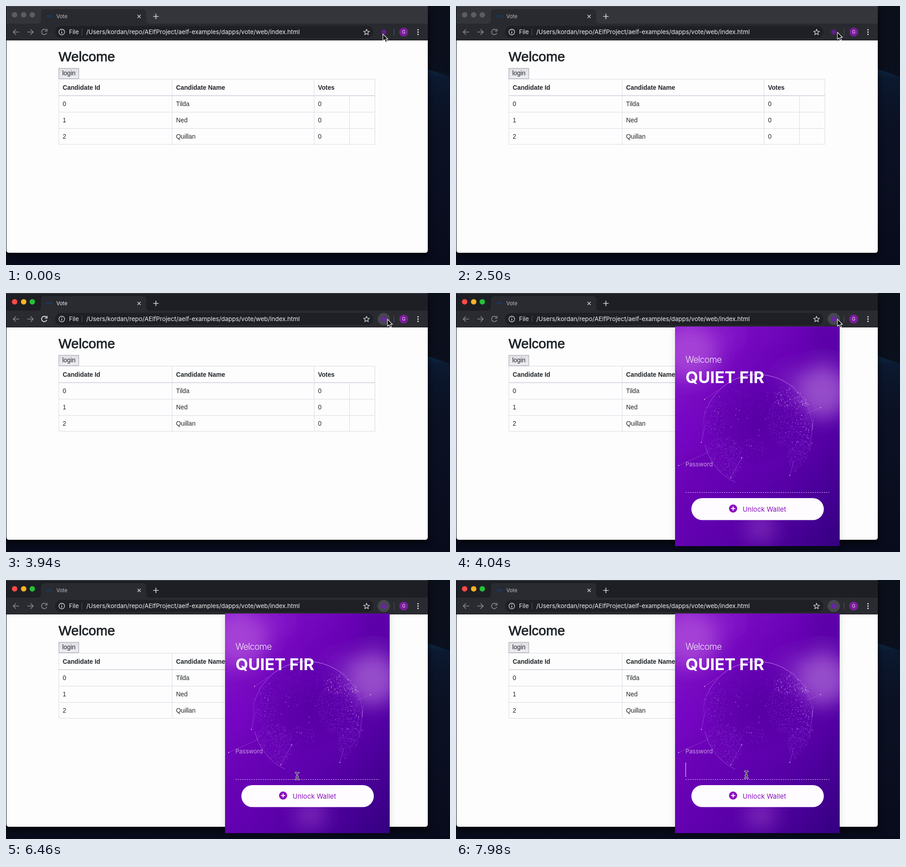
Recreate the animation shown at these times as an HTML page. Size 979x572 px, loop 8000 ms.

```html
<!DOCTYPE html>
<html lang="en">
<head>
<meta charset="utf-8">
<title>Vote</title>
<style>
  html, body { margin: 0; width: 100%; height: 100%; overflow: hidden; background: #0a0d1c; }
  svg { display: block; width: 979px; height: 572px; }
  text { white-space: pre; }
  .ui { font-family: Inter, "Noto Sans", sans-serif; }
  .page { font: 13.8px "Liberation Sans", Arial, sans-serif; fill: #212529; }
  .bold { font-weight: 700; }
  .line { fill: none; stroke-width: 1.7; }
</style>
</head>
<body>
<svg viewBox="0 0 979 572">
  <defs>
    <linearGradient id="desk" x2="0" y2="1">
      <stop offset="0" stop-color="#0b0f1a"/>
      <stop offset=".6" stop-color="#0b1022"/>
      <stop offset="1" stop-color="#080b1c"/>
    </linearGradient>
    <linearGradient id="ridge" x2="0" y2="1">
      <stop offset="0" stop-color="#0c2a44"/>
      <stop offset=".1" stop-color="#0b1930"/>
      <stop offset="1" stop-color="#0a1024" stop-opacity="0"/>
    </linearGradient>
    <linearGradient id="button" x2="0" y2="1">
      <stop offset="0" stop-color="#dedee4"/>
      <stop offset="1" stop-color="#ececf1"/>
    </linearGradient>
    <linearGradient id="violet" x2="1" y2="1">
      <stop offset="0" stop-color="#8a16d0"/>
      <stop offset=".4" stop-color="#6a02b6"/>
      <stop offset=".7" stop-color="#5600a6"/>
      <stop offset="1" stop-color="#340080"/>
    </linearGradient>
    <linearGradient id="rim" x2="0" y2="1">
      <stop offset="0" stop-color="#d9a0ff" stop-opacity=".85"/>
      <stop offset=".45" stop-color="#c080f8" stop-opacity=".15"/>
      <stop offset=".7" stop-color="#c080f8" stop-opacity="0"/>
    </linearGradient>
    <radialGradient id="ball" cy=".4">
      <stop offset="0" stop-color="#4c0098" stop-opacity=".5"/>
      <stop offset=".75" stop-color="#5a00aa" stop-opacity=".4"/>
      <stop offset="1" stop-color="#6a08c0" stop-opacity=".1"/>
    </radialGradient>
    <filter id="soft" x="-60%" y="-60%" width="220%" height="220%"><feGaussianBlur stdDeviation="20"/></filter>
    <filter id="shade" x="-20%" y="-20%" width="140%" height="140%"><feGaussianBlur stdDeviation="7"/></filter>
    <clipPath id="card"><rect x="483" y="74" width="363" height="485"/></clipPath>
    <clipPath id="win"><path d="M1 0H930V539Q930 545 924 545H7Q1 545 1 539Z"/></clipPath>
  </defs>

  <rect width="979" height="572" fill="url(#desk)"/>
  <path d="M925 138L979 156V340H925Z" fill="url(#ridge)"/>
  <rect x="1" y="10" width="931" height="543" rx="6" fill="#000" opacity=".6" filter="url(#shade)"/>

  <g clip-path="url(#win)">
    <rect width="930" height="545" fill="#fdfdfd"/>
    <rect id="strip" width="930" height="40"/>
    <rect id="bar" y="39" width="930" height="36.5"/>
    <path id="tab" d="M69 39Q77 39 77 31V15Q77 7 85 7H301Q309 7 309 15V31Q309 39 317 39Z"/>
    <path d="M0 .5H930" stroke="#55565c"/>
    <path d="M0 75.5H930" stroke="#191a1e"/>
    <rect x="108" y="44" width="702" height="27" rx="13.5" fill="#1f2025"/>
  </g>

  <g id="lights"></g>
  <rect x="89" y="20" width="13" height="5" fill="#1b3552"/>
  <g class="ui">
    <text id="title" x="111" y="27" font-size="11.4">Vote</text>
    <text x="139" y="62" font-size="13" fill="#eeeef0">File</text>
    <text x="177" y="62" font-size="13.4" fill="#f0f0f2">/Users/kordan/repo/AElfProject/aelf-examples/dapps/vote/web/index.html</text>
  </g>
  <g class="line" stroke="#d4d5d8">
    <path d="M290 19.5l7 7m0-7l-7 7" stroke-width="1.4"/>
    <path d="M324.5 23h12M330.5 17v12"/>
    <path d="M29 57.5H16.5m5.5-6l-6 6 6 6M47 57.5H59.5m-5.5-6l6 6-6 6" stroke="#88898e"/>
    <path id="reload" d="M89 53.5A6 6 0 1 0 90 59.5M90.5 50.5V55.5H85.5"/>
    <circle cx="123" cy="57.5" r="6.2" stroke-width="1.4"/>
    <path d="M123 56.5V61M123 53.5V55" stroke-width="1.6"/>
    <path d="M167.5 50V65M855.5 50V65" stroke="#56575e" stroke-width="1"/>
    <path id="star" stroke-width="1.3" stroke-linejoin="round"/>
  </g>
  <circle id="halo" cx="833" cy="57.5" r="13.5"/>
  <circle id="ext" cx="833" cy="57.5" r="5.8"/>
  <circle cx="877" cy="57.5" r="9.8" fill="#7a1d9b"/>
  <text class="ui" x="877" y="61" font-size="9.8" text-anchor="middle" fill="#f3e8f7">G</text>
  <path d="M908.5 52.5v.01m0 5v.01m0 5v.01" stroke="#e6e6e8" stroke-width="3.2" stroke-linecap="round"/>

  <g class="page">
    <text x="116" y="121.5" font-size="30" stroke="#212529" stroke-width=".9">Welcome</text>
    <rect x="116.5" y="137.5" width="44" height="23" fill="url(#button)" stroke="#a3a3ad"/>
    <text x="124" y="153">login</text>
    <path d="M116.5 161.5H813.5V305.5H116.5ZM366.5 161V305M679.5 161V305M757.5 198V305M116 234.5H814M116 270.5H814" fill="none" stroke="#dadbe5"/>
    <path d="M116 198H814" stroke="#d8d9e2" stroke-width="2"/>
    <g id="cells"></g>
  </g>

  <g id="popup">
    <rect x="483" y="76" width="363" height="484" opacity=".15" filter="url(#shade)"/>
    <g clip-path="url(#card)">
      <rect x="483" y="74" width="363" height="485" fill="url(#violet)"/>
      <g id="glow" filter="url(#soft)"></g>
      <circle cx="665" cy="301" r="121" fill="url(#ball)"/>
      <circle cx="665" cy="301" r="121" fill="none" stroke="url(#rim)"/>
      <path d="M549 335A121 121 0 0 0 616 418" fill="none" stroke="#c88cf5" opacity=".5"/>
      <path id="dust" stroke="#b878ee" opacity=".5"/>
      <path id="sparks" stroke="#ecc8fb" stroke-width="1.6" opacity=".8"/>
      <path d="M491 381L556 352M606 408L630 364M773 266L804 253M548 235L578 214M541 330L549 292M736 403L745 370M788 278L779 347" fill="none" stroke="#d6a0f2" stroke-width=".8" opacity=".4"/>
      <path d="M491 381v.01M606 408v.01M630 364v.01M804 253v.01M548 235v.01M541 330v.01M736 403v.01" stroke="#f0d2ff" stroke-width="2" stroke-linecap="round"/>
    </g>
    <g class="ui" fill="#fff">
      <text x="506" y="153.5" font-size="19.5" font-weight="300" letter-spacing="-.7" opacity=".9">Welcome</text>
      <text x="506" y="199" font-size="36" font-weight="700">QUIET FIR</text>
      <text x="506" y="383" font-size="13" fill="#c99be4">Password</text>
      <path d="M506 440.5H823" stroke="#d9b2ee" stroke-dasharray="3 2"/>
      <rect x="519" y="453" width="292" height="48.5" rx="24.25" fill="#fefcff"/>
      <circle cx="611" cy="476" r="9" fill="#8a12bd"/>
      <path d="M606.5 476h9M611 471.5v9" stroke="#fff" stroke-width="2"/>
      <text x="632" y="482.5" font-size="14.8" fill="#8a12bd">Unlock Wallet</text>
    </g>
    <path id="caret" d="M506.5 403V435" stroke="#f3e4fb"/>
  </g>

  <path id="arrow" d="M0 0V15.5L3.6 12.2 6.2 18 9 16.8 6.5 11.2H11.3Z" fill="#08080c" stroke="#f4f4f6" stroke-width="1.2" stroke-linejoin="round"/>
  <g id="beam" fill="none" stroke-linecap="round"></g>
</svg>
<script>
const $ = id => document.getElementById(id);
const set = (id, name, value) => $(id).setAttribute(name, value);
const show = (id, on) => set(id, 'visibility', on ? 'visible' : 'hidden');

// Static parts
const label = (x, y, s, cls = '') => `<text x="${x}" y="${y}" class="${cls}">${s}</text>`;
const heads = ['Candidate Id', 'Candidate Name', 'Votes'];
const names = ['Tilda', 'Ned', 'Quillan'];
const columns = [125, 375, 688];
$('cells').innerHTML =
  heads.map((s, i) => label(columns[i], 184.5, s, 'bold')).join('') +
  names.map((name, r) => [r, name, 0].map((s, i) => label(columns[i], 221 + r * 36, s)).join('')).join('');

$('lights').innerHTML = [19, 39, 58].map(x => `<circle cx="${x}" cy="19.5" r="6"/>`).join('');

const beamPath = 'M-3.5 -7.5Q0 -7.5 0 -5Q0 -7.5 3.5 -7.5M0 -5V5M-3.5 7.5Q0 7.5 0 5Q0 7.5 3.5 7.5M-2 2H2';
$('beam').innerHTML = [['#f4eef8', 3.2], ['#16101e', 1.3]].map(([color, width]) =>
  `<path d="${beamPath}" stroke="${color}" stroke-width="${width}"/>`).join('');

set('star', 'd', 'M' + Array.from({ length: 10 }, (_, i) => {
  const a = i * Math.PI / 5 - Math.PI / 2, r = i % 2 ? 2.9 : 6.8;
  return `${(795 + r * Math.cos(a)).toFixed(2)} ${(58 + r * Math.sin(a)).toFixed(2)}`;
}).join('L') + 'Z');

const glows = [
  [515, 130, 62, '#b254dc', .7], [595, 95, 35, '#9428cf', .4],
  [808, 218, 58, '#a866d4', .75], [735, 190, 35, '#8532c8', .4],
  [672, 518, 34, '#9a48c8', .5], [505, 300, 40, '#7a0cd0', .4],
  [815, 100, 40, '#5400a0', .5]
];
$('glow').innerHTML = glows.map(([x, y, r, c, o]) =>
  `<circle cx="${x}" cy="${y}" r="${r}" fill="${c}" opacity="${o}"/>`).join('');

let seed = 11;
const rand = () => (seed = seed * 16807 % 2147483647) / 2147483647;

// Dots scattered in ellipses, kept inside the globe
function scatter(areas) {
  let d = '';
  for (const [cx, cy, rx, ry, n] of areas) {
    for (let i = 0; i < n; i++) {
      const a = rand() * 2 * Math.PI, r = Math.sqrt(rand());
      const x = cx + rx * r * Math.cos(a), y = cy + ry * r * Math.sin(a);
      if (Math.hypot(x - 665, y - 301) < 125) d += `M${x.toFixed(1)} ${y.toFixed(1)}h1`;
    }
  }
  return d;
}
set('dust', 'd', scatter([
  [590, 365, 42, 50, 620], [572, 275, 28, 45, 150], [735, 285, 50, 60, 480],
  [740, 230, 40, 28, 240], [757, 360, 26, 38, 300], [650, 345, 35, 22, 70], [645, 235, 60, 40, 70]
]));
set('sparks', 'd', scatter([
  [740, 232, 36, 22, 55], [768, 243, 10, 8, 24], [755, 295, 32, 40, 34],
  [565, 260, 25, 45, 14], [645, 290, 40, 50, 12], [782, 315, 9, 35, 12]
]));

// Moments of the hard changes, in ms
const FOCUS = 2960, PRESS = 3340, OPEN = 4040, CARET = 6880;

// Pointer: time, x, y
const track = [
  [0, 831, 62], [840, 831, 62], [960, 841, 58], [4700, 841, 58], [5340, 679, 413],
  [5440, 679, 413], [6180, 642, 433], [6500, 642, 433], [7020, 640, 430], [8000, 640, 430]
];
function pointer(t) {
  const i = Math.max(1, track.findIndex(k => k[0] > t));
  const [t0, x0, y0] = track[i - 1], [t1, x1, y1] = track[i];
  const p = (t - t0) / (t1 - t0), e = p * p * (3 - 2 * p);
  return [x0 + (x1 - x0) * e, y0 + (y1 - y0) * e];
}

function render(t) {
  const active = t >= FOCUS, open = t >= OPEN, focused = active && !open;
  const surface = active ? '#2a2b31' : '#292a2f';
  set('strip', 'fill', active ? '#1e1f25' : '#34353b');
  set('bar', 'fill', surface);
  set('tab', 'fill', surface);
  const hues = active ? ['#fc4b48', '#fdb225', '#24c138'] : ['#5c5d62', '#5c5d62', '#5c5d62'];
  [...$('lights').children].forEach((dot, i) => dot.setAttribute('fill', hues[i]));
  set('title', 'fill', focused ? '#f0f0f2' : '#bcbdc2');
  set('reload', 'stroke', focused ? '#f0f0f2' : '#88898e');
  show('halo', active);
  set('halo', 'fill', t >= PRESS ? '#45464e' : '#3a3546');
  set('ext', 'fill', t >= PRESS ? '#6b23a6' : '#5f1d86');
  show('popup', open);
  show('caret', t >= CARET);

  const [x, y] = pointer(t), typing = open && y > 395;
  const place = `translate(${x.toFixed(2)} ${y.toFixed(2)})`;
  set('arrow', 'transform', place);
  set('beam', 'transform', place);
  show('arrow', !typing);
  show('beam', typing);
}

const start = performance.now();
function tick() {
  render((performance.now() - start) % 8000);
  requestAnimationFrame(tick);
}
tick();
</script>
</body>
</html>
```
